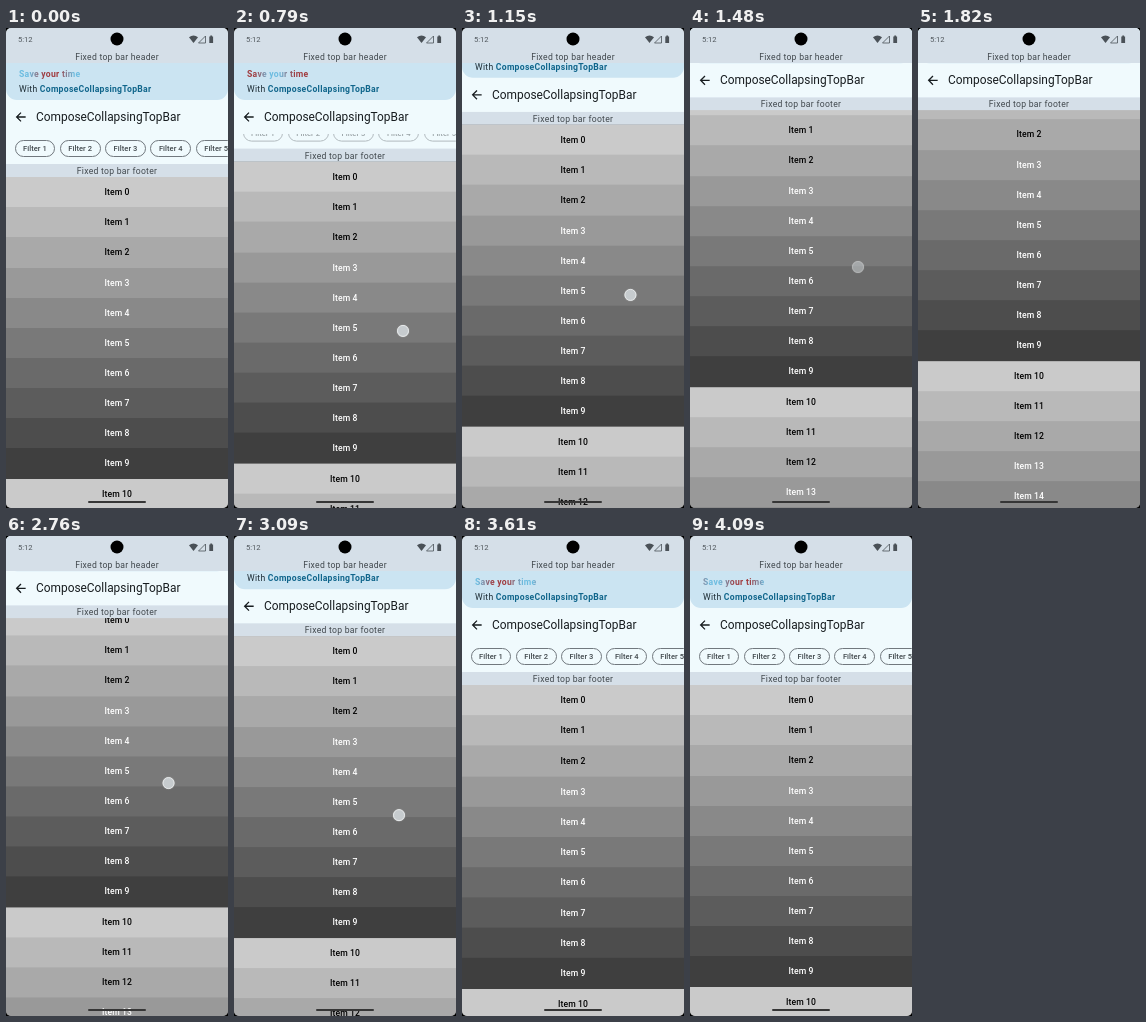
These frames come from a looping animation (222 px wide and 480 px high, 4150 ms). An HTML page:

```html
<!DOCTYPE html>
<html lang="en">
<head>
<meta charset="utf-8">
<title>Collapsing top bar</title>
<style>
  html, body { margin: 0; width: 100%; height: 100%; overflow: hidden; }
  html { background: #000; }
  body { position: relative; border-radius: 5px; background: #777; color: #000; font: 8.64px Roboto, sans-serif; white-space: nowrap; }
  body > *, #upper > *, #lower > * { position: absolute; }
  #list { top: 149.2px; width: 100%; transform-origin: 0 0; }
  #list div { height: 31.15px; margin-bottom: -1px; line-height: 31px; text-align: center; font-weight: 500; letter-spacing: .08px; }
  #upper, #lower { top: 0; left: 0; width: 100%; }
  .bar { left: 0; width: 100%; background: #d5dfe8; color: #41484d; text-align: center; letter-spacing: .27px; }
  #head { top: 0; height: 35.2px; }
  #head p { margin: 22.4px 0 0; line-height: 14px; }
  #foot { top: 136.3px; height: 12.9px; line-height: 14px; }
  #row { top: 70px; width: 100%; height: 66.5px; background: #f0fafd; overflow: hidden; }
  #row span { position: absolute; top: 42.1px; box-sizing: border-box; width: 40.8px; height: 17.2px;
    border: .6px solid #71787e; border-radius: 9px; color: #40484c; text-align: center;
    font-weight: 500; font-size: 7.56px; line-height: 16px; letter-spacing: .05px; }
  #title { top: 35px; width: 100%; height: 71.3px; background: #f0fafd; }
  #title b { position: absolute; left: 30px; top: 36.7px; font-weight: 400; font-size: 11.9px; line-height: 34.6px; color: #171c1f; }
  #title svg { position: absolute; left: 8px; top: 47px; }
  #banner { top: 35px; width: 100%; height: 36.7px; background: #cbe4f2; border-radius: 0 0 11px 11px; letter-spacing: .27px; }
  #banner div { position: absolute; left: 13px; line-height: 13px; color: #1c2b33; }
  #banner b { color: #11668c; }
  #wave { top: 4.5px; font-weight: 700;
    background: linear-gradient(90deg, #6cbce0, #6cbce0 18%, #9e3d42 45%, #a13a3c 72%, #6cbce0) 0 0 / 55px 100%;
    -webkit-background-clip: text; background-clip: text; -webkit-text-fill-color: transparent; }
  #clock { left: 12px; top: 5px; line-height: 13px; font-size: 7.6px; color: #50575c; }
  #icons { left: 0; top: 0; }
  #nav { left: 82px; top: 472.6px; width: 58px; height: 2px; border-radius: 2px; background: #363636; }
  #touch { left: -6px; top: -6px; box-sizing: border-box; width: 12px; height: 12px; border-radius: 50%;
    background: #c6cbce; border: 1.2px solid #e6e9ea; box-shadow: 0 0 1px #ccc; }
</style>
</head>
<body>
<div id="list"></div>
<div id="lower">
  <div id="row"></div>
  <div id="foot" class="bar">Fixed top bar footer</div>
</div>
<div id="upper">
  <div id="title">
    <svg width="14" height="14" viewBox="0 0 24 24"><path d="M20 12H5M12 4.5 4.5 12l7.5 7.5" fill="none" stroke="#171c1f" stroke-width="2.2"/></svg>
    <b>ComposeCollapsingTopBar</b>
  </div>
  <div id="banner">
    <div id="wave">Save your time</div>
    <div style="top:19.5px">With <b>ComposeCollapsingTopBar</b></div>
  </div>
</div>
<div id="head" class="bar"><p>Fixed top bar header</p></div>
<div id="clock">5:12</div>
<svg id="icons" width="222" height="24" fill="#4a5157">
  <circle cx="111" cy="11" r="6.5" fill="#000"/>
  <path d="M183 9.2q4.5-3.4 9 0L187.5 15z"/>
  <path d="M199.5 8v7h-7z" fill="none" stroke="#4a5157" stroke-width=".8"/>
  <path d="M203.3 8.5h1v-1h1.8v1h1V15h-3.8z"/>
</svg>
<div id="touch"></div>
<div id="nav"></div>
<script>
const LOOP = 4150, CHIPS = 30.2, BANNER = 36.7;
const $ = id => document.getElementById(id);
const clamp = (v, lo = 0, hi = 1) => Math.min(hi, Math.max(lo, v));
const part = (t, a, b) => clamp((t - a) / (b - a));
const move = (el, x, y, more = '') => { el.style.transform = `translate(${x}px,${y}px)${more}`; };

for (let i = 0; i < 17; i++) {
  const item = document.createElement('div'), n = i % 10;
  const g = Math.round(202 - n * 15.4 - n * (9 - n) * .18);
  item.textContent = 'Item ' + i;
  item.style.background = `rgb(${g},${g},${g})`;
  item.style.color = n < 3 ? '#000' : '#fff';
  $('list').append(item);
}
const chips = [1, 2, 3, 4, 5].map(n => {
  const chip = document.createElement('span');
  chip.textContent = 'Filter ' + n;
  chip.style.left = 8.5 + (n - 1) * 45.3 + 'px';
  $('row').append(chip);
  return chip;
});

// Total scroll: drag up, fling, rest, drag down, fling back
function scrollAt(t) {
  const up = 81 * part(t, 641, 1430) + 37 * (1 - (1 - part(t, 1430, 1900)) ** 3);
  return up - 76.4 * part(t, 2347, 3170) - 41.6 * part(t, 3170, 3480);
}

function draw(t) {
  const s = scrollAt(t);
  const chipShift = Math.min(s, CHIPS);
  const bannerShift = clamp(s - CHIPS, 0, BANNER);
  const k = part(t, 3480, 3910);
  const stretch = 1 + .045 * k * (1 - k) ** 2;

  move($('list'), 0, -s, ` scaleY(${stretch})`);
  move($('upper'), 0, -bannerShift);
  move($('lower'), 0, -bannerShift - chipShift);
  for (const chip of chips) chip.style.opacity = 1 - chipShift / CHIPS;
  $('wave').style.backgroundPositionX = t * .0285 % 55 + 'px';

  const first = t < 2000;
  const p = first ? part(t, 600, 1430) : part(t, 2290, 3170);
  if (first) move($('touch'), 169.3 - 1.3 * p, 322 - 83 * p);
  else move($('touch'), 159 + 6.6 * p, 201.4 + 85.4 * p);
  $('touch').style.opacity = first
    ? part(t, 580, 610) * (1 - part(t, 1430, 1550))
    : part(t, 2270, 2300) * (1 - part(t, 3170, 3290));
}

const start = performance.now();
function frame() {
  draw((performance.now() - start) % LOOP);
  requestAnimationFrame(frame);
}
frame();
</script>
</body>
</html>
```
